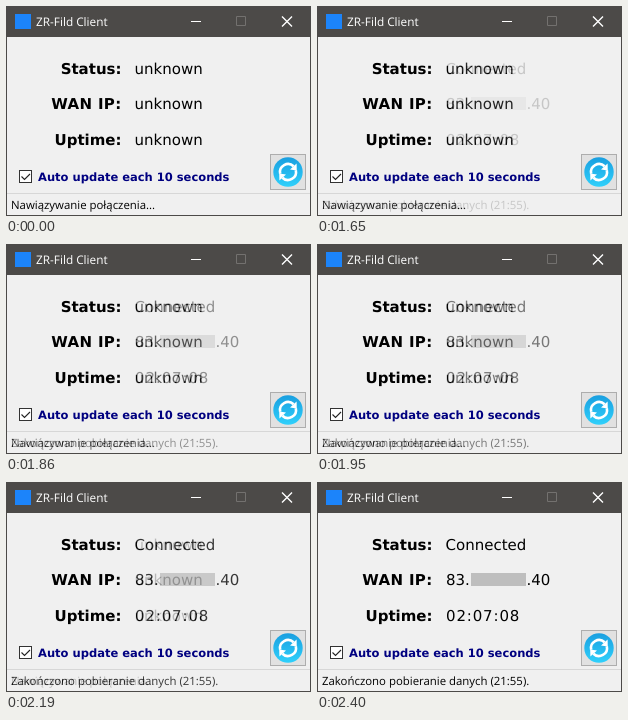
Animation, 305 px wide and 210 px high, one loop 4.9 s. Source, as an HTML page:

```html
<!DOCTYPE html>
<html lang="pl">
<head>
<meta charset="utf-8">
<title>Client status</title>
<style>
  html, body { margin: 0; width: 100%; height: 100%; overflow: hidden; }
  svg { display: block; width: 305px; height: 210px; text-rendering: geometricPrecision; }
  .ui { font: 11.4px "Open Sans", "Noto Sans", sans-serif; }
  .value { font: 15px "DejaVu Sans", sans-serif; }
  .label { font: bold 15px "DejaVu Sans", sans-serif; text-anchor: end; }
  .option { font: bold 11.5px "DejaVu Sans", sans-serif; fill: #000080; }
  .clock { letter-spacing: .85px; }
  .address { letter-spacing: .35px; }
  .line { fill: none; stroke-width: 1; }
</style>
</head>
<body>
<svg viewBox="0 0 305 210">
  <defs>
    <linearGradient id="blue" x2="0" y2="1">
      <stop offset="0" stop-color="#1a9fe0"/>
      <stop offset="1" stop-color="#2fd0fb"/>
    </linearGradient>
    <g id="arrow">
      <path d="M-7.8 1.8A8 8 0 0 1 5.6 -5.7" fill="none" stroke="#fff" stroke-width="2.6"/>
      <path d="M8.6 -8.4L8.8 -1.6L2 -2.4Z" fill="#fff"/>
    </g>
  </defs>

  <!-- Window -->
  <rect width="305" height="210" fill="#4c4a48"/>
  <rect x="1" y="31" width="303" height="178" fill="#f0f0f0"/>
  <rect x="9" y="8" width="16" height="15" fill="#1c84fa"/>
  <text class="ui" x="30" y="20" fill="#fff" style="font-size:11.8px">ZR-Fild Client</text>
  <path class="line" stroke="#fff" d="M185 15.5h10"/>
  <path class="line" stroke="#fff" style="stroke-width:1.4" d="M276 10.5l10 10m0-10l-10 10"/>
  <path class="line" stroke="#73716f" d="M230.5 10.5h9v9h-9z"/>

  <!-- Form -->
  <g class="label">
    <text x="115.5" y="68">Status:</text>
    <text class="address" x="115.5" y="103">WAN IP:</text>
    <text x="115.5" y="139">Uptime:</text>
  </g>
  <rect x="13.5" y="164.5" width="12" height="12" fill="#fff" stroke="#333"/>
  <path class="line" stroke="#222" style="stroke-width:1.1" d="M15.5 170.5l3 3l5.5-5.5"/>
  <text class="option" x="32" y="175">Auto update each 10 seconds</text>
  <rect x="264.5" y="148.5" width="35" height="35" fill="#e1e1e1" stroke="#adadad"/>
  <g transform="translate(282 166)">
    <circle r="14.7" fill="url(#blue)"/>
    <use href="#arrow"/>
    <use href="#arrow" transform="rotate(180)"/>
  </g>
  <path class="line" stroke="#d7d7d7" d="M1 187.5h303"/>

  <!-- Connecting -->
  <g class="value">
    <text x="128.5" y="68">unknown</text>
    <text x="128.5" y="103">unknown</text>
    <text x="128.5" y="139">unknown</text>
  </g>
  <text class="ui" x="5" y="203">Nawiązywanie połączenia...</text>

  <!-- Connected: an opaque layer faded in over the previous state -->
  <g id="connected" opacity="0">
    <path fill="#f0f0f0" d="M125 50h115v98h-115zM2 189h230v19h-230z"/>
    <g class="value">
      <text x="128.6" y="68">Connected</text>
      <text x="129" y="103">83.</text>
      <rect x="154" y="91" width="55" height="13" fill="#bebebe"/>
      <text x="209.5" y="103">.40</text>
      <text class="clock" x="129" y="139">02:07:08</text>
    </g>
    <text class="ui" x="5" y="203">Zakończono pobieranie danych (21:55).</text>
  </g>
</svg>
<script>
  const LOOP = 4900, FADE_START = 1530, STEP = 30, STEPS = 30;
  const connected = document.getElementById('connected');
  const start = performance.now();

  function draw() {
    const time = (performance.now() - start) % LOOP;
    const step = Math.floor((time - FADE_START) / STEP) + 1;
    connected.setAttribute('opacity', Math.min(Math.max(step / STEPS, 0), 1));
    requestAnimationFrame(draw);
  }
  draw();
</script>
</body>
</html>
```
